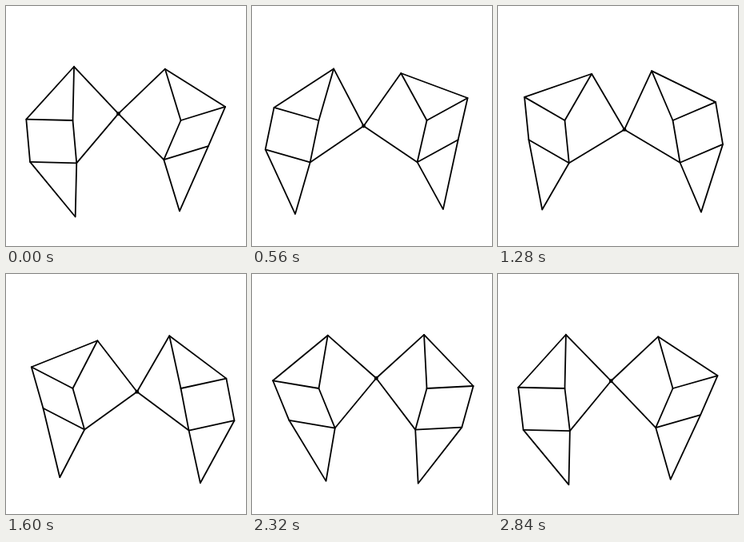
An HTML page with a canvas that plays this animation: 300 px wide and 300 px high, repeating every 2880 ms.

```html
<!DOCTYPE html>
<html>
<head>
<meta charset="utf-8">
<title>Walking linkage</title>
<style>
  html, body { margin: 0; width: 100%; height: 100%; overflow: hidden; background: #fff; }
  canvas { display: block; width: 100vw; height: 100vh; }
</style>
</head>
<body>
<canvas id="stage" width="300" height="300"></canvas>
<script>
const ctx = document.getElementById('stage').getContext('2d');
const LOOP = 2880, STEP = 40;
const UNIT = 13.45;                       // crank radius
const CENTER = { x: 151, y: 143 };
const PIVOT = 5.02 * UNIT, UPPER = 5 * UNIT, LOWER = 3.98 * UNIT, ROD = 6.01 * UNIT;
const WIDTH_RATIO = 58.2 / UPPER;         // short to long side of the right triangles
const START = 218.5 * Math.PI / 180;

const add = (a, b) => ({ x: a.x + b.x, y: a.y + b.y });
const sub = (a, b) => ({ x: a.x - b.x, y: a.y - b.y });

// Joint of two bars of lengths ra and rb that start at a and b.
function joint(a, ra, b, rb, side) {
  const v = sub(b, a), d = Math.hypot(v.x, v.y);
  const along = (ra * ra - rb * rb + d * d) / (2 * d);
  const across = side * Math.sqrt(ra * ra - along * along);
  return {
    x: a.x + (along * v.x - across * v.y) / d,
    y: a.y + (along * v.y + across * v.x) / d
  };
}

function polyline(...points) {
  ctx.beginPath();
  points.forEach(p => ctx.lineTo(p.x, p.y));
  ctx.stroke();
}

// dir is -1 for the left leg and 1 for the right leg.
function drawLeg(pin, dir) {
  const hip = { x: CENTER.x + dir * PIVOT, y: CENTER.y };
  const top = joint(hip, UPPER, pin, ROD, dir);
  const knee = joint(hip, LOWER, pin, ROD, -dir);
  const up = sub(top, hip);
  const out = { x: -dir * up.y * WIDTH_RATIO, y: dir * up.x * WIDTH_RATIO };
  const shoulder = add(hip, out);
  const ankle = add(knee, out);
  const foot = sub(knee, up);
  polyline(pin, top, shoulder, ankle, foot, knee, pin);
  polyline(top, hip, knee, ankle);
  polyline(hip, shoulder);
}

function draw(now) {
  const time = Math.floor(now % LOOP / STEP) * STEP;
  const angle = START - 2 * Math.PI * time / LOOP;
  const pin = {
    x: CENTER.x + UNIT * Math.cos(angle),
    y: CENTER.y + UNIT * Math.sin(angle)
  };
  ctx.fillStyle = '#fff';
  ctx.fillRect(0, 0, 300, 300);
  ctx.strokeStyle = ctx.fillStyle = '#000';
  ctx.lineWidth = 1.8;
  ctx.lineJoin = ctx.lineCap = 'round';
  drawLeg(pin, -1);
  drawLeg(pin, 1);
  ctx.beginPath();
  ctx.arc(pin.x, pin.y, 2.4, 0, 2 * Math.PI);
  ctx.fill();
}

const origin = performance.now();
function tick() {
  draw(performance.now() - origin);
  requestAnimationFrame(tick);
}
tick();
</script>
</body>
</html>
```
